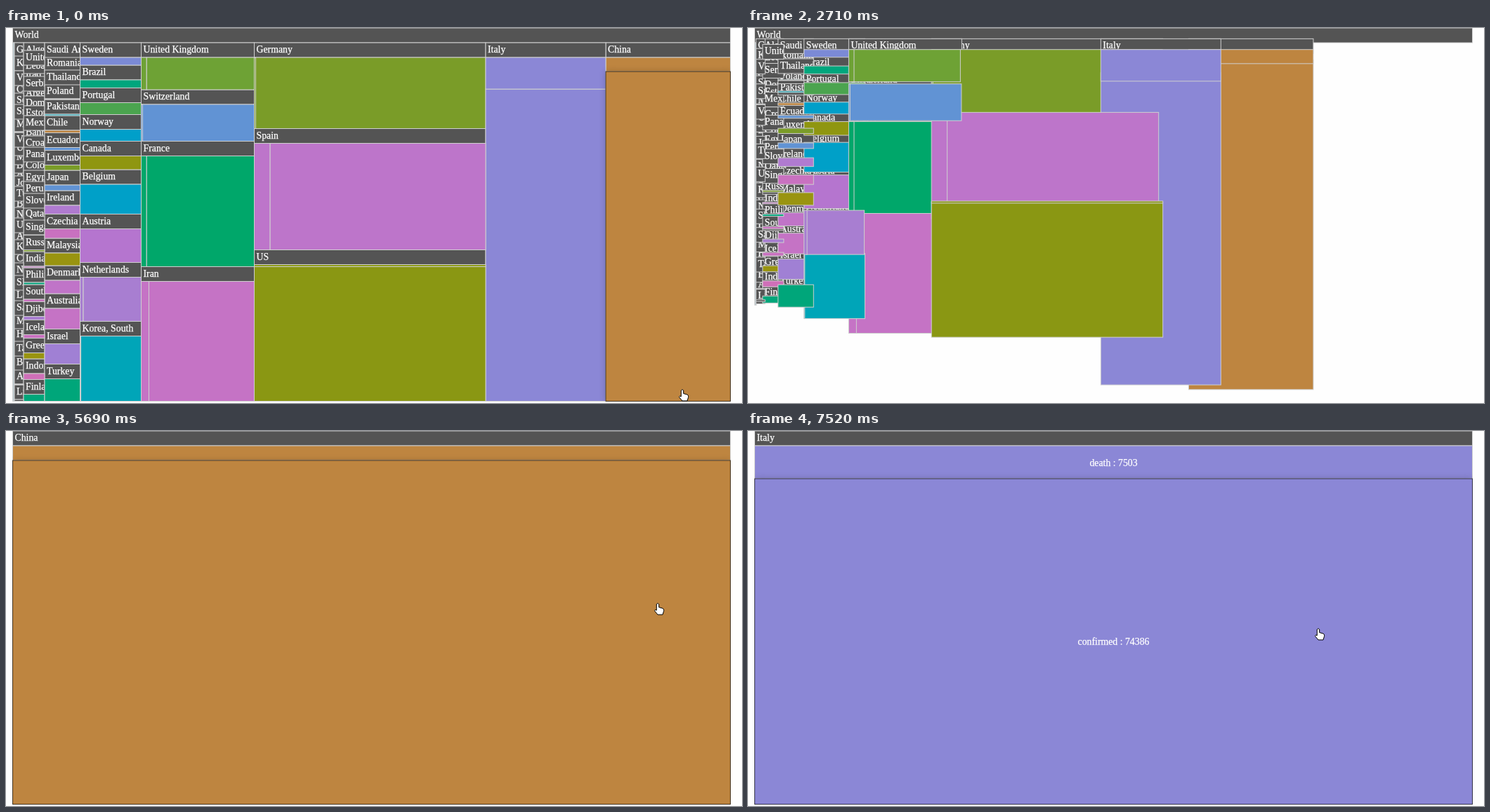
These frames come from a looping animation (1048x535 px, 8000 ms). An HTML page with a canvas:

```html
<!DOCTYPE html>
<html>
<head>
<meta charset="utf-8">
<style>
html, body { margin: 0; width: 100%; height: 100%; overflow: hidden; background: #fefefe; }
canvas { display: block; }
</style>
</head>
<body>
<canvas id="stage" width="1048" height="535"></canvas>
<script>
const ctx = document.getElementById('stage').getContext('2d');
const LEFT = 9.5, RIGHT = 1031.5, BOTTOM = 532.5, HEAD = 21, LOOP = 8000, DURATION = 550;
const GRAY = '#545454', LINE = '#cfcfcf';

// Per column: left edge, then "name:top:color:split", split is a fraction (h = stacked, v = side by side).
const columns = [
  [12, `Ghana:21|Kyrgyzstan:40|Vietnam:61|Cuba:78|Senegal:93|Sri Lanka:109|Malta:127|Venezuela:149|
Uzbekistan:161|Moldova:174|Brunei:186|Azerbaijan:198|Jordan:211|Tunisia:226|Bulgaria:241|Nigeria:256|
Uruguay:271|Andorra:287|Kuwait:302|Costa Rica:319|New Zealand:335|Slovakia:353|Latvia:371|San Marino:389|
Morocco:408|Hungary:427|Taiwan:447|Bosnia:467|Armenia:487|Lithuania:509`],
  [25, `Algeria:21|United Arab Emirates:32|Lebanon:44|Iraq:56|Serbia:69|Argentina:83|Dominican Republic:97|
Estonia:111|Mexico:125|Bahrain:139|Croatia:154|Panama:170|Colombia:186|Egypt:203|Peru:219|Slovenia:236|
Qatar:255|Singapore:274|Russia:295.5:7a9c28|India:319:c573c5|Philippines:342:00a67d|South Africa:366:c971c0|
Djibouti:390.5:a87ed1|Iceland:416.5:c971c0|Greece:442.5:999410|Indonesia:472:cf6fb8|Finland:501.5:00a67a`],
  [55, `Saudi Arabia:21|Romania:40|Thailand:60|Poland:80:00a5a5|Pakistan:102:00a5b8|Chile:125:be8540|
Ecuador:149.5:6193d4|Luxembourg:174.5:7a9c28|Japan:203:6193d4|Ireland:232:b07bd0|Czechia:265.5:c971c0|
Malaysia:300:999410|Denmark:339:c074c8|Australia:379:c573c5|Israel:429.5:a080d4|Turkey:479.5:00a67a`],
  [105.5, `Sweden:21:7b8ad6|Brazil:53:00a67d|Portugal:85.5:4ba44f|Norway:123.5:009fc9|Canada:161.5:8f9610|
Belgium:202:00a0c8|Austria:265.5:b575cf|Netherlands:334.5:a87ed1:v.05|Korea, South:418.5:00a5b8:v.012`],
  [192.5, `United Kingdom:21:6ea235:v.047|Switzerland:88:6193d4:v.012|France:161.5:00a76a:v.047|Iran:340.5:c573c5:v.068`],
  [353.5, `Germany:21:7a9c28:v.006|Spain:143.5:bd75ca:v.068|US:316.5:8a9713:h.015`],
  [683, `Italy:21:8b87d6:h.092`],
  [854, `China:21:be8540:h.041`]
];
const values = { China: [3285, 81661], Italy: [7503, 74386] };

const countries = columns.flatMap(([x, text], c) => {
  const rows = text.split('|').map(row => row.trim().split(':'));
  const right = c + 1 < columns.length ? columns[c + 1][0] : RIGHT;
  return rows.map(([name, top, color, split], i) => ({
    name, split, x, y: +top, right,
    bottom: rows[i + 1] ? +rows[i + 1][1] : BOTTOM,
    color: color ? '#' + color : GRAY
  }));
}).sort((a, b) => a.name < b.name ? -1 : 1);
const find = name => countries.find(c => c.name === name);

// Pointer tip: time, x, y.
const paths = [
  [[0, 963, 516], [70, 963, 516], [450, 972, 550]],
  [[3480, 960, 533], [3820, 948, 60], [3900, 946, 66], [4250, 928, 246],
   [6430, 928, 246], [6900, 812, 282], [LOOP, 812, 282]]
];

const clamp = v => Math.min(1, Math.max(0, v));
const mix = (a, b, k) => a + (b - a) * k;
function quinticInOut(p) {
  p = clamp(p);
  return p < .5 ? 16 * p ** 5 : 1 - 16 * (1 - p) ** 5;
}
// Eased progress, refreshed once per step like the recorded screen.
const tween = (t, start, step) =>
  quinticInOut(Math.floor((t - start) / step) * step / DURATION);

function pointerAt(t) {
  for (const path of paths) {
    for (let i = 1; i < path.length; i++) {
      const [t0, x0, y0] = path[i - 1], [t1, x1, y1] = path[i];
      if (t < t0 || t >= t1) continue;
      const p = (t - t0) / (t1 - t0), k = p * p * (3 - 2 * p);
      return { x: mix(x0, x1, k), y: mix(y0, y1, k) };
    }
  }
  return null;
}

function box(r, color, line = LINE) {
  ctx.fillStyle = color;
  ctx.fillRect(r.x, r.y, r.w, r.h);
  ctx.strokeStyle = line;
  ctx.strokeRect(r.x, r.y, r.w, r.h);
}

function write(text, x, y, align) {
  ctx.save();
  ctx.fillStyle = ctx.strokeStyle = '#fff';
  ctx.lineWidth = .25;
  ctx.textAlign = align;
  ctx.fillText(text, x, y);
  ctx.strokeText(text, x, y);
  ctx.restore();
}

function header(r, name) {
  box(r, GRAY);
  ctx.save();
  ctx.beginPath();
  ctx.rect(r.x, r.y, r.w - .5, r.h);
  ctx.clip();
  write(name, r.x + 3, r.y + 14, 'left');
  ctx.restore();
}

function splitLeaf(r, split) {
  if (!split) return [r];
  const f = +split.slice(1);
  return split[0] === 'h'
    ? [{ ...r, y: r.y + r.h * f, h: r.h * (1 - f) }, { ...r, h: r.h * f }]
    : [{ ...r, x: r.x + r.w * f, w: r.w * (1 - f) }, { ...r, w: r.w * f }];
}

function drawHand({ x, y }) {
  ctx.save();
  ctx.translate(x, y);
  ctx.fillStyle = '#fff';
  ctx.strokeStyle = '#000';
  const hand = new Path2D('M-1.7 1Q0-1.5 1.7 1V5.5L7 7Q9 7.6 8.7 10.5L7 16H0L-4.5 10.5Q-4 8-1.7 9.8Z');
  ctx.fill(hand);
  ctx.stroke(hand);
  ctx.restore();
}

function draw(t) {
  ctx.clearRect(0, 0, 1048, 535);
  if (t >= 2340 && t < 2460) return;

  const grow = t < 2340 ? 1 : tween(t, 2402, 76.8);
  const focus = find(t < 6500 ? 'China' : 'Italy');
  const zoom = t < 5700 ? tween(t, 4243, 79) : t < 6500 ? 1 - tween(t, 5731, 82) : tween(t, 6965, 79);
  const scale = (RIGHT - LEFT) / (focus.right - focus.x);
  const mapX = x => mix(x, LEFT + (x - focus.x) * scale, zoom);
  const mapY = y => mix(y, (y - HEAD) * BOTTOM / (BOTTOM - HEAD), zoom);
  const place = r => ({ ...r, x: LEFT + (r.x - LEFT) * grow, y: r.y * grow });

  ctx.save();
  ctx.beginPath();
  ctx.rect(LEFT - .5, 0, RIGHT - LEFT + 1, BOTTOM + .5);
  ctx.clip();
  ctx.lineWidth = 1;
  ctx.font = '13.8px "Liberation Serif", "Times New Roman", serif';

  header({ x: mapX(LEFT), y: mapY(0), w: mapX(RIGHT) - mapX(LEFT), h: HEAD }, 'World');
  box({ x: mapX(LEFT), y: mapY(HEAD), w: mapX(12) - mapX(LEFT), h: (BOTTOM - HEAD) * grow }, '#b9c9cf');

  const leaves = [];
  for (const c of countries) {
    const x = mapX(c.x), y = mapY(c.y), w = mapX(c.right) - x, h = mapY(c.bottom) - y - HEAD;
    header(place({ x, y, w, h: HEAD }), c.name);
    if (h < 1) continue;
    splitLeaf({ x, y: y + HEAD, w, h }, c.split)
      .forEach(r => leaves.push({ ...place(r), color: c.color }));
  }
  leaves.forEach(r => box(r, r.color));

  const pointer = pointerAt(t);
  const hovered = pointer && leaves.filter(r =>
    pointer.x > r.x && pointer.x < r.x + r.w && pointer.y > r.y && pointer.y < r.y + r.h).pop();
  if (hovered) {
    ctx.save();
    ctx.shadowBlur = 9;
    ctx.shadowColor = 'rgba(0,0,0,.2)';
    ctx.fillStyle = hovered.color;
    ctx.fillRect(hovered.x, hovered.y, hovered.w, hovered.h);
    ctx.restore();
    box(hovered, hovered.color, 'rgba(0,0,0,.65)');
  }

  if (zoom === 1 && !(t >= 5690 && t < 6500)) {
    const [death, confirmed] = values[focus.name];
    const [big, small] = splitLeaf({ y: HEAD, h: BOTTOM - HEAD }, focus.split);
    const label = (text, r) => write(text, (LEFT + RIGHT) / 2, r.y + r.h / 2 + 5, 'center');
    label('death : ' + death, small);
    label('confirmed : ' + confirmed, big);
  }
  ctx.restore();
  if (pointer) drawHand(pointer);
}

function tick() {
  draw(performance.now() % LOOP);
  requestAnimationFrame(tick);
}
tick();
</script>
</body>
</html>
```
